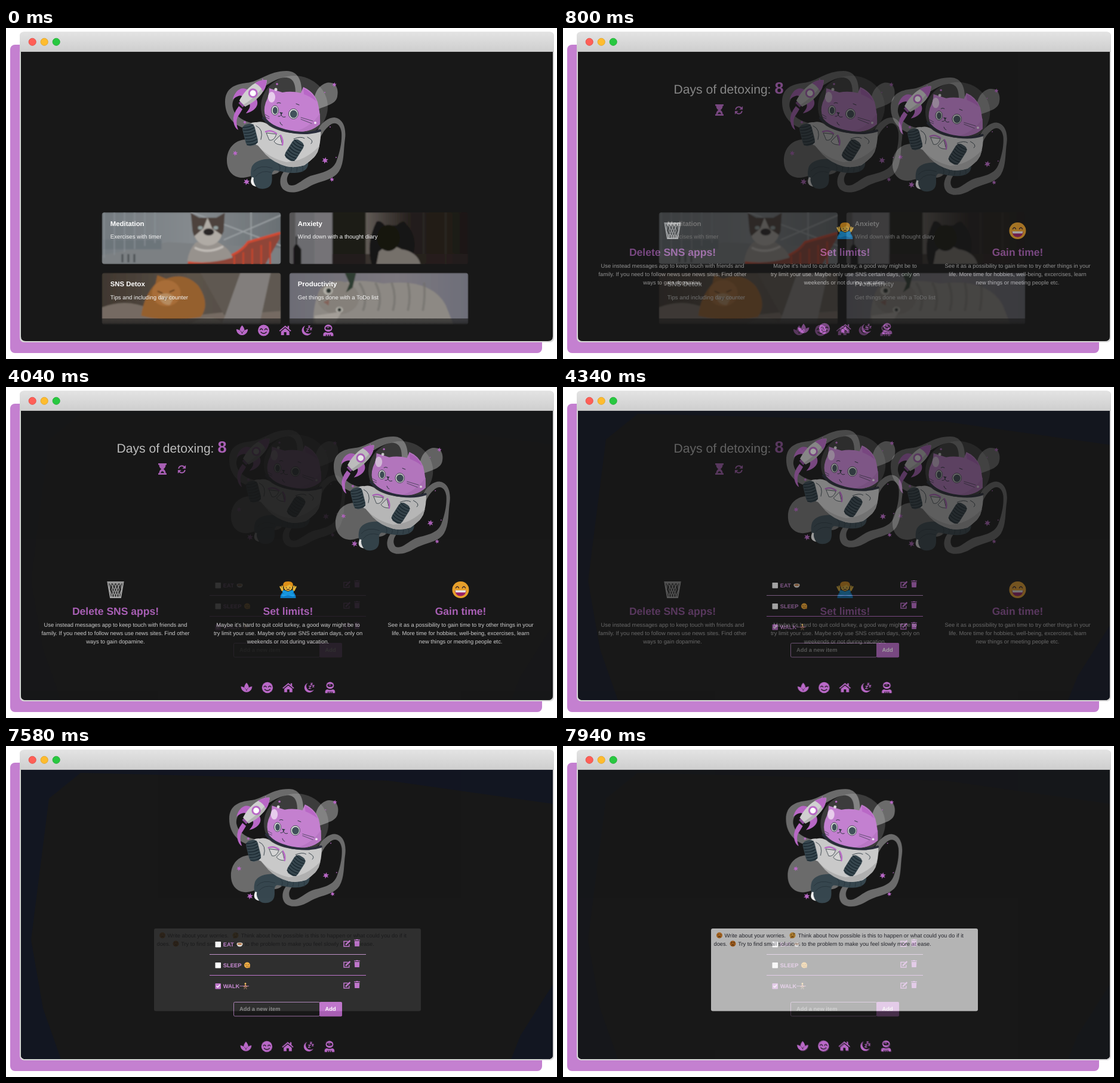
These frames come from a looping animation (923 by 555 pixels, 8000 ms). An HTML page:

```html
<!DOCTYPE html>
<html lang="en">
<head>
<meta charset="utf-8">
<title>Wellbeing app tour</title>
<style>
html, body { margin: 0; width: 100%; height: 100%; overflow: hidden; background: #fff; }
svg { display: block; width: 923px; height: 555px; }
text { font-family: "Liberation Sans", Arial, sans-serif; text-rendering: geometricPrecision; white-space: pre; }
</style>
</head>
<body>
<svg id="stage" viewBox="0 0 923 555" xmlns="http://www.w3.org/2000/svg"></svg>
<script>
const BG = '#181818', PURPLE = '#b968c7', LILAC = '#c480d0', SLATE = '#37474f';
const LOOP = 8000, STEP = 60, STEPS = 10, STARTS = [500, 4040, 7580];

const path = (d, fill, more = '') => `<path d="${d}" fill="${fill}" ${more}/>`;
const line = (d, stroke, w = 1, more = '') => path(d, 'none', `stroke="${stroke}" stroke-width="${w}" stroke-linecap="round" ${more}`);
const rect = (x, y, w, h, fill, more = '') => `<rect x="${x}" y="${y}" width="${w}" height="${h}" fill="${fill}" ${more}/>`;
const oval = (x, y, rx, ry, fill, more = '') => `<ellipse cx="${x}" cy="${y}" rx="${rx}" ry="${ry}" fill="${fill}" ${more}/>`;
const dot = (x, y, r, fill, more) => oval(x, y, r, r, fill, more);
const label = (x, y, s, size, fill, more = '') => `<text x="${x}" y="${y}" font-size="${size}" fill="${fill}" ${more}>${s}</text>`;
const at = (x, y, body, more = '') => `<g transform="translate(${x} ${y}) ${more}">${body}</g>`;
const range = (n, f) => Array.from({ length: n }, (_, i) => f(i)).join('');
const BOLD = 'font-weight="700"', MID = 'text-anchor="middle"';

function star(x, y, r) {
  const pts = range(12, i => {
    const a = i * Math.PI / 6 + .2, q = i % 2 ? r * .45 : r;
    return `${(x + q * Math.sin(a)).toFixed(1)},${(y - q * Math.cos(a)).toFixed(1)} `;
  });
  return `<polygon points="${pts}" fill="${PURPLE}"/>`;
}

function rocket() {
  const fin = path('M-8 1C-23 3-24 18-16 31C-15 21-13 16-7 15Z', PURPLE);
  return path('M390 131Q379 145 381 157Q383 168 389 171Q384 158 388 149Q394 140 396 136Z', PURPLE) +
    at(413, 110, fin + `<g transform="scale(-1 1)">${fin}</g>` + rect(-5, 22, 10, 6, '#8d4c9a') +
      path('M0-33C14-20 13 6 7 24H-7C-13 6-14-20 0-33Z', '#d0d0d0') +
      path('M0-33C14-20 13 6 7 24H3C7 6 7-20 0-33Z', '#b4b4b4') +
      path('M0-33Q8-25 10-15Q0-19-10-15Q-8-25 0-33Z', PURPLE) +
      dot(0, -1, 6.5, '#fff', `stroke="${PURPLE}" stroke-width="3"`), 'rotate(46)');
}

function mascot() {
  const ribbon = '#6b6b6b', ink = '#26323a';
  const glove = rect(-10.5, -18.5, 21, 37, SLATE, 'rx="8"') + range(7, i => line(`M-9 ${i * 5 - 15}Q0 ${i * 5 - 12} 9 ${i * 5 - 15}`, '#17242c', 1.3));
  const eye = (x, y, rx, ry) => oval(x, y, rx, ry, '#dcdcdc', `stroke="${ink}" stroke-width=".8"`) + oval(x + .3, y + .3, rx - 2, ry - 2, '#41525b');
  return path('M412 171C385 168 367 150 367 124C367 100 385 94 403 92C425 90 440 72 470 72C491 72 497 92 495 114L485 108C485 92 480 82 466 83C445 86 432 104 405 106C385 108 377 122 380 134C383 148 400 158 416 160Z', ribbon) +
    path('M519 138C512 120 518 98 537 92C552 89 558 102 555 115C552 129 535 130 519 138Z', ribbon) +
    path('M401 187C383 188 370 202 370 222C370 240 381 252 398 251C415 249 424 240 437 245Q450 248 459 240L440 200C425 194 415 187 401 187Z', ribbon) +
    path('M520 175C528 158 540 150 550 150C565 152 570 168 568 185C565 205 567 225 558 240C548 256 525 256 508 266C492 276 475 279 465 271C455 262 460 245 468 238L482 236C470 245 468 256 474 263C485 268 495 254 510 248C530 242 548 240 554 222C560 205 563 190 562 175C560 160 550 155 540 165C532 172 528 180 524 190Z', ribbon) +
    rocket() +
    oval(483, 132, 56, 52, '#fff', 'opacity=".16"') +
    path('M412 232C418 221 435 218 450 220L506 222C508 236 500 243 480 243C465 243 455 238 449 239C443 243 447 250 445 259C443 269 432 271 424 269C412 264 407 246 412 232Z', SLATE) +
    range(5, i => line(`M${456 + i * 10} 228Q${462 + i * 9} 234 ${457 + i * 10} 241`, ink, .8)) +
    line('M415 240Q425 228 446 235M418 249Q428 237 444 242', ink, .8) +
    path('M412 250Q406 263 419 266Q413 258 415 251Z', '#f1f1f1') +
    path('M404 166Q408 157 420 158Q432 155 441 164Q460 176 490 177L527 172Q528 190 522 208Q515 220 500 230Q485 235 470 232Q450 226 435 212L422 197Q408 193 404 166Z', '#c9c9c9') +
    path('M423 198Q440 218 470 225Q500 224 525 198Q521 212 516 217L500 230Q485 235 470 232Q448 226 435 212Z', '#b0b0b0') +
    line('M419 164Q432 170 427 187M505 183Q517 189 511 194M500 185Q494 181 482 186', ink, .9) +
    path('M436 176L441 188Q449 190 453 178Z', '#d5d5d5', `stroke="${ink}" stroke-width=".8"`) +
    line('M435 174Q444 170 453 177', PURPLE, 2.6) +
    path('M459 180L449 190Q452 196 463 196Z', '#d5d5d5', `stroke="${ink}" stroke-width=".8"`) +
    line('M460 180Q465 188 463 196', PURPLE, 2.6) +
    at(409, 179, glove, 'rotate(-14)') + at(483, 205, glove, 'rotate(32)') +
    path('M441 101L463 108Q478 105 494 109L498 99Q515 106 522 124Q527 145 526 161Q510 176 482 174Q452 171 436 152Q430 140 435 125Q441 113 441 101Z', LILAC) +
    path('M498 101Q514 108 520 123Q512 116 499 111Z', PURPLE) +
    path('M526 143L526 161Q510 176 482 174Q509 168 526 143Z', '#b877c4') +
    line('M431 151Q447 170 484 175Q508 178 526 172', '#292d3b', 4) +
    eye(450.5, 138, 6, 8) + eye(481.5, 144, 8, 8.5) +
    path('M458 141L464 142L461 145Z', ink) +
    line('M461 145Q460 149 456 148M461 145Q462 151 468 149M459 158Q460 162 463 163M454 126Q457 124 460 126M486 127L491 129', ink, 1) +
    line('M494 150L514 156M494 153L512 160M434 145L441 149M433 149L441 152', ink, .7) +
    oval(445, 116, 6, 9, '#fff', 'opacity=".6"') + dot(452, 103, 2.5, '#fff', 'opacity=".8"') + dot(518, 159, 2, '#fff', 'opacity=".8"') +
    star(384, 210, 4.5) + star(403, 258, 5.7) + star(534.5, 222, 5.7) + star(546, 254, 4) + star(550, 95, 4) + star(400, 158, 3) +
    [[454, 94, 1.8], [430, 86, 1], [534, 108, .9], [543, 166, .9], [553, 217, .9]].map(p => dot(...p, PURPLE)).join('');
}

const icons = {
  lotus: path('M0-8.5Q4-4 4 0Q1.2 1.5 0 4Q-1.2 1.5-4 0Q-4-4 0-8.5ZM-9.7-2Q-2.5-1.5 0 6Q2.5-1.5 9.7-2C9.5 4 5 8 0 8C-5 8-9.5 4-9.7-2Z', PURPLE),
  smile: dot(0, 0, 9.5, PURPLE) + line('M-6-1Q-4-4.5-1.8-1M1.8-1Q4-4.5 6-1M-4.6 3Q0 7.5 4.6 3', BG, 1.4),
  home: path('M0-8L4-4.7V-7.5H6.5V-2.6L10 .4L8.8 1.8L0-5.4L-8.8 1.8L-10 .4ZM0-3.7L7 2V8H2V3H-2V8H-7V2Z', PURPLE),
  moon: path('M-2.5-8A8.5 8.5 0 1 0 8 3.5A7.3 7.3 0 0 1-2.5-8Z', PURPLE) +
    line('M-.5-2.5H3L-.5 1.8H3M2.8-7.5H5.2L2.8-4.7H5.2M6-3.8H8.3L6-1H8.3', PURPLE, 1.2),
  pilot: oval(0, -3.7, 6.6, 6, PURPLE) + rect(-4.6, -6.3, 9.2, 5, BG, 'rx="2.5"') + line('M-2-4.5H1', PURPLE, 1.2) +
    path('M-8.5 9.5V7Q-8.5 3.5-4.5 3Q0 5.2 4.5 3Q8.5 3.5 8.5 7V9.5H4V7H-4V9.5Z', PURPLE) + rect(-2.6, 7, 2, 2.5, PURPLE) + rect(.8, 7, 1.8, 2.5, PURPLE),
  hourglass: path('M-7-9.5H7V-7H5.5Q5.5-2.5 1.8 0Q5.5 2.5 5.5 7H7V9.5H-7V7H-5.5Q-5.5 2.5-1.8 0Q-5.5-2.5-5.5-7H-7Z', PURPLE) + path('M-3.2 6.8Q0 .8 3.2 6.8Z', BG),
  refresh: line('M-5.2-1.8A5.4 5.4 0 0 1 4.2-3.8M5.2 1.8A5.4 5.4 0 0 1-4.2 3.8', PURPLE, 1.9) + path('M6.6-7V-1.2H.9ZM-6.6 7V1.2H-.9Z', PURPLE),
  edit: line('M1-3.5H-5V5H3.8V1.5', PURPLE, 1.5) + line('M-1 1.4L4.6-4', PURPLE, 2.6) + path('M-2.6 3L-2-.2L.6 2.4Z', PURPLE),
  bin: path('M-5-5.8H-2L-1.4-6.6H1.4L2-5.8H5V-4.4H-5ZM-4.3-3.4H4.3L3.8 5.6H-3.8Z', PURPLE)
};

const nav = (x, y, gap, k) => ['lotus', 'smile', 'home', 'moon', 'pilot'].map((n, i) => at(x + i * gap, y, icons[n], `scale(${k})`)).join('');
const hero = (x, y, k) => `<use href="#mascot" transform="translate(${x} ${y}) scale(${k}) translate(-367 -72)"/>`;

// Soft flat pictures, in card coordinates 300 x 87
const photos = [
  rect(0, 0, 300, 87, 'url(#haze)') + path('M0 72L110 50L300 60V87H0Z', '#7c8083') + rect(0, 46, 100, 16, '#6c747a') +
    range(6, i => line(`M${4 + i * 17} 0V${76 - i * 5}`, '#8a9297', 1.5)) + line('M150 0L300 56M205 46L300 5M250 0V50', '#9a9fa2', 2) +
    range(3, i => rect(33 + i * 10, 70, 3, 14, '#4c5053')) +
    path('M143 87L150 79Q215 84 242 52L298 34V44L274 87Z', '#8f4538') + line('M146 84Q222 84 245 50L298 35', '#d04a30', 4) +
    range(5, i => line(`M${222 + i * 15} ${74 - i * 6}V87`, '#bd452f', 3)) +
    path('M143 82Q146 62 158 50H194Q214 60 219 76Q180 88 143 82Z', '#97928d') +
    path('M149 1L163 9H192L206 1L204 32Q196 53 177 53Q156 51 152 32Z', '#4d433d') +
    path('M177 9L170 27L155 40Q162 55 178 56Q196 54 201 38L185 27Z', '#b0aba5') + oval(179, 33, 9, 6, '#2c2726') + oval(165, 26, 4, 3, '#939f9f') + oval(191, 26, 4, 3, '#939f9f') +
    line('M157 60Q178 70 202 58', '#c0bbb6', 4),
  rect(0, 0, 300, 87, '#1d1a18') + rect(0, 0, 72, 87, '#6c6c6f') + rect(0, 0, 10, 87, '#565557') + rect(42, 0, 30, 87, '#747377') +
    rect(128, 0, 172, 87, 'url(#dusk)') + line('M225 0V87M262 0V87', '#2c2521', 3) + rect(72, 70, 228, 17, '#27221f', 'opacity=".7"') +
    path('M138 87Q128 52 146 16Q152 12 160 22H180Q192 10 196 20Q214 38 209 66L202 87Z', '#191614') +
    path('M150 66Q168 50 188 62Q214 66 220 87H146Z', '#75706b') + oval(166, 43, 19, 22, '#141210') +
    path('M7 87V60L10 54H14L20 62V87Z', '#121212') + line('M12 54V41', '#171717', 2),
  rect(0, 0, 300, 87, 'url(#wood)') + path('M0 58Q40 42 80 60L150 72L300 56V87H0Z', '#746b62') + path('M165 0H300V64L205 71Z', '#5f5851') +
    path('M66 72Q70 40 90 18L93 4L108 10Q140 -2 162 22Q182 52 166 74Q110 84 66 72Z', '#95602f') + oval(108, 34, 24, 22, '#a86d37') +
    path('M94 38Q108 30 122 40L114 54Q100 55 94 38Z', '#b68c60') + line('M94 31L101 34M114 32L121 29M104 43H109', '#4b321c', 1.8) +
    path('M205 76L232 0H283L264 87H200Z', '#827e7b') + path('M145 87Q182 64 206 87Z', '#80796f'),
  rect(0, 0, 300, 87, 'url(#linen)') + path('M40 87Q40 48 53 25L78 20Q112 8 157 18Q237 8 262 54L275 87Z', '#8d8984') +
    oval(82, 42, 35, 28, '#85807a') + range(5, i => line(`M${118 + i * 27} 18Q${132 + i * 24} 40 ${124 + i * 25} 62`, '#726e69', 4, 'opacity=".6"')) +
    oval(65, 30, 8, 7, '#b2b0a8') + dot(66, 30, 4, '#2a302e') + oval(84, 62, 6, 5, '#b2b0a8') + dot(84, 62, 3, '#2a302e') +
    path('M57 49L67 45L66 55Z', '#83635a') + path('M93 0L101 18L95 33L106 25L112 0Z', '#2f3c31') + path('M42 72L88 65L75 87H45Z', '#a39e98')
];

function home() {
  const cards = [
    ['Meditation', 'Exercises with timer'], ['Anxiety', 'Wind down with a thought diary'],
    ['SNS Detox', 'Tips and including day counter'], ['Productivity', 'Get things done with a ToDo list']
  ];
  return hero(367, 72, 1) + cards.map(([name, sub], i) => {
    const x = i % 2 ? 474.5 : 160.5, y = i < 2 ? 309 : 410.5;
    return at(x, y, `<g clip-path="url(#card)"><g filter="url(#soft)">${photos[i]}</g></g>` +
      label(14.3, 22.5, name, 11.35, '#fff', BOLD) + label(14.3, 44, sub, 9.65, '#f4f4f4'));
  }).join('') + rect(155, 487, 625, 38, 'url(#fade)') + nav(395.5, 507, 36.1, 1);
}

function basket() {
  return path('M-13-13H13L8.5 13H-8.5Z', '#2b2b2b', 'stroke="#b8b8b8" stroke-width="2"') +
    range(4, i => line(`M${i * 6 - 9}-12L${i * 4 - 2} 0L${i * 4 - 7} 12M${i * 6 - 9}-12L${i * 4 - 10} 0L${i * 4 - 5} 12`, '#b8b8b8', 1.2)) +
    rect(-13.5, -14, 27, 3.5, '#a5a5a5', 'rx="1"');
}

function refuser() {
  return path('M-13 14Q-13 4-5 3H5Q13 4 13 14Z', '#0b86d8') + dot(0, -5, 7.2, '#ffc83d') +
    path('M-8-5Q-10-14 0-14Q10-14 8-5Q4-6 3-9Q-3-5-8-5Z', '#f59f18') +
    line('M-8 9L7 3M8 9L-7 3', '#16a5f5', 5) + line('M-10 1L-13-5M-9 0L-10-6M10 1L13-5M9 0L10-6', '#ffc83d', 2.4) +
    line('M-3-4V-3M3-4V-3M-2 0Q0-1.5 2 0', '#633b26', 1.3);
}

function grin() {
  return dot(0, 0, 14, '#ffb02e') + line('M-8-3Q-5.5-8-3-3M3-3Q5.5-8 8-3', '#402a32', 1.6) +
    path('M-9.5 1H9.5Q8.5 10.5 0 10.5Q-8.5 10.5-9.5 1Z', '#a61f70') + path('M-9 1H9L8 4.5H-8Z', '#fff');
}

function detox() {
  const tips = [
    [basket, 'Delete SNS apps!', 'Use instead messages app to keep touch with friends and', 'family. If you need to follow news use news sites. Find other', 'ways to gain dopamine.'],
    [refuser, 'Set limits!', "Maybe it's hard to quit cold turkey, a good way might be to", 'try limit your use. Maybe only use SNS certain days, only on', 'weekends or not during vacation.'],
    [grin, 'Gain time!', 'See it as a possibility to gain time to try other things in your', 'life. More time for hobbies, well-being, excercises, learn', 'new things or meeting people etc.']
  ];
  return hero(549, 83, .967) + label(185.5, 110, 'Days of detoxing:', 21.1, '#d0d0d0') + label(354.5, 109.5, '8', 27.2, PURPLE, BOLD) +
    at(262, 137.5, icons.hourglass) + at(294.5, 138, icons.refresh) +
    tips.map(([draw, title, ...lines], i) => at(183.5 + i * 289, 0, at(0, 340, draw()) +
      label(0, 382.3, title, 17.55, PURPLE, `${BOLD} ${MID}`) +
      lines.map((s, j) => label(0, 401.5 + j * 14, s, 9.37, '#e2e2e2', MID)).join(''))).join('') +
    nav(403, 504, 35, .97);
}

function todo() {
  const food = path('M-5 0H5Q4 4 0 4Q-4 4-5 0Z', '#d8d8d8') + oval(0, -.6, 5, 2.4, '#f1e6d4') + oval(0, -.6, 3.6, 1.5, '#b16a37');
  const sleepy = dot(0, 0, 5, '#eea52f') + line('M-3-1L-1-.5M1-.5L3-1M-1.5 2.3H1.5', '#70451d', .9) + dot(3, 3, 1.8, '#d48a24');
  const walker = dot(0, -4, 1.4, '#f0bd56') + line('M0-2V1.2M0-1L2.5 .8M0-1L-2.3 1', '#d9872e', 1.6) + line('M0 1L2 4.8M0 1L-2 4.8', '#70523e', 1.5);
  const rows = [['EAT', food, 391.5], ['SLEEP', sleepy, 404], ['WALK', walker, 401]];
  return path('M25 40H916V97L640 58L125 45L72 88L42 325L62 440L92 525H25ZM916 400V525H846L862 485Z', '#121623') +
    hero(374, 72, .967) + rows.map(([name, pic, x], i) => at(0, 332.5 + i * 35, rect(350.5, -4.5, 9.5, 9.5, i < 2 ? '#fff' : PURPLE, 'rx=".8"') +
      label(363.8, 3.2, name, 9.35, LILAC, BOLD) + at(x, 0, pic) + at(571, -1.5, icons.edit) + at(588, -2, icons.bin) +
      (i < 2 ? rect(341, 16.5, 262, 1, i ? PURPLE : '#b987c3') : line('M352.8 .2L354.7 2L358-2', '#fff', 1.3) + rect(391, -.4, 16, .8, LILAC)))).join('') +
    rect(381.5, 429.5, 144, 23.5, 'none', 'rx="2" stroke="#a678b0"') + rect(525, 429, 38, 24.5, PURPLE, 'rx="2"') +
    label(391, 444.3, 'Add a new item', 9.35, '#7d7d7d', BOLD) + label(534.5, 444.3, 'Add', 9.4, '#fff', BOLD) + nav(402, 504, 35, .97);
}

function diary() {
  const ink = '#292a34';
  const face = (fill, extra) => dot(0, 0, 5, fill) + line('M-2.2-1.2V-.8M2.2-1.2V-.8M-2 2.7Q0 1 2 2.7', '#583414', 1.1) + extra;
  return hero(373.3, 72.3, .967) + rect(248, 306, 447, 138.5, '#f6f6f6', 'rx="3"') +
    at(262, 317.5, face('#de8425', '')) + label(270.5, 321, 'Write about your worries.', 9.25, ink) +
    at(384.5, 317.5, face('#e7a637', line('M-3 4L1 3', '#c87d20', 2) + line('M1-3.5L4-3', '#583414', .8))) +
    label(393.7, 321, 'Think about how possible is this to happen or what could you do if it', 9.27, ink) +
    label(252.5, 335, 'does.', 9.27, ink) + at(284.5, 331.5, face('#d87a20', line('M-3-3L-1-2M1-2L3-3', '#583414', .8))) +
    label(293.2, 335, 'Try to find small solutions to the problem to make you feel slowly more at ease.', 9.27, ink) +
    nav(401.3, 502.8, 34.9, .97);
}

const gradient = (id, dir, stops) => `<linearGradient id="${id}" ${dir}>` + stops.map(([o, c, a = 1]) => `<stop offset="${o}" stop-color="${c}" stop-opacity="${a}"/>`).join('') + '</linearGradient>';
const DOWN = 'x1="0" y1="0" x2="0" y2="1"';
const defs = '<defs>' + gradient('bar', DOWN, [[0, '#e3e3e3'], [1, '#cecece']]) +
  gradient('haze', '', [[0, '#747b80'], [.5, '#858a8e'], [1, '#6a7074']]) +
  gradient('dusk', '', [[0, '#625c57'], [.2, '#443e3a'], [.45, '#241e1b'], [1, '#1e1916']]) +
  gradient('wood', '', [[0, '#40372f'], [.5, '#5c534a'], [1, '#4e4944']]) +
  gradient('linen', '', [[0, '#6d6d76'], [.6, '#7d7980'], [1, '#6d6e79']]) +
  gradient('fade', DOWN, [[0, BG, .6], [.18, BG, .7], [.32, BG], [1, BG]]) +
  '<filter id="soft" x="-5%" y="-5%" width="110%" height="110%"><feGaussianBlur stdDeviation="1.1"/></filter>' +
  `<clipPath id="card">${rect(0, 0, 300, 87, '#000', 'rx="4.5"')}</clipPath>` +
  `<clipPath id="view">${path('M25 40H916V517Q916 525 908 525H33Q25 525 25 517Z', '#000')}</clipPath>` +
  `<g id="mascot">${mascot()}</g></defs>`;

const frame = rect(7, 28, 891, 517, LILAC, 'rx="8"') + rect(23, 6.5, 895, 520.5, '#d7d7d7', 'rx="7"') +
  path('M23 40V13.5Q23 6.5 30 6.5H911Q918 6.5 918 13.5V40Z', 'url(#bar)') + rect(24, 39, 893, 1, '#bdbdbd') +
  [['#ff5f57', '#df4942'], ['#febc2e', '#dda024'], ['#28c840', '#1eaa31']].map(([c, edge], i) => dot(44.2 + i * 20, 23.3, 6.1, c, `stroke="${edge}" stroke-width=".8"`)).join('');

const stage = document.getElementById('stage');
stage.innerHTML = defs + frame + '<g clip-path="url(#view)">' +
  [home, detox, todo, diary].map(draw => `<g class="scene">${rect(24, 39, 893, 487, BG)}${draw()}</g>`).join('') + '</g>';
const scenes = [...stage.querySelectorAll('.scene')];

function render(t) {
  STARTS.forEach((start, i) => {
    const step = Math.floor((t - start) / STEP) + 1;
    const mix = Math.max(0, Math.min(1, step / STEPS));
    scenes[i + 1].style.opacity = mix;
    scenes[i + 1].style.display = mix ? '' : 'none';
  });
}

const began = performance.now();
function tick() {
  render((performance.now() - began) % LOOP);
  requestAnimationFrame(tick);
}
tick();
</script>
</body>
</html>
```
